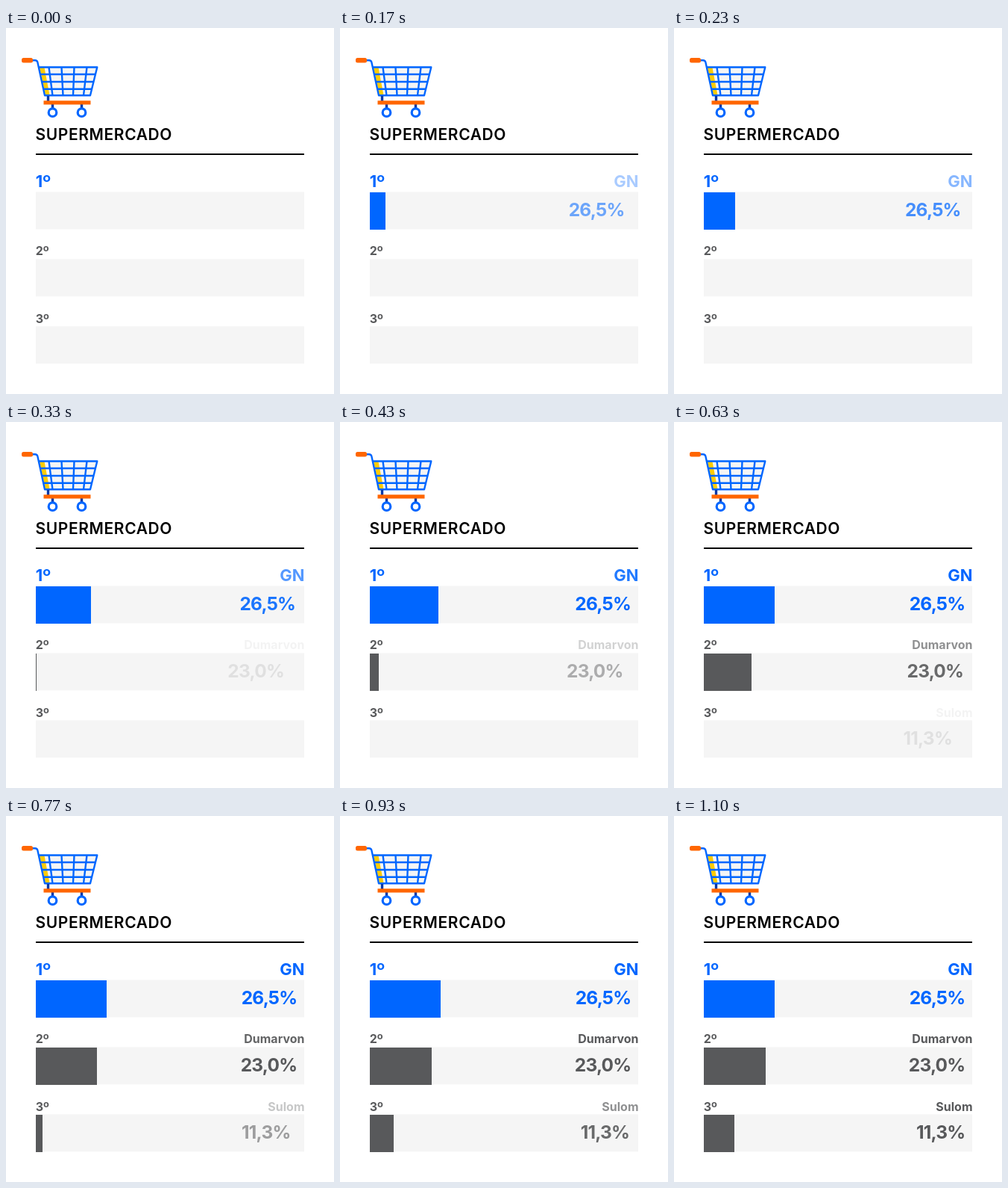
Recreate the animation shown at these times as an HTML page. Size 440 px wide and 490 px high, loop 1130 ms.

```html
<!DOCTYPE html>
<html lang="pt">
<head>
<meta charset="utf-8">
<title>Supermercado</title>
<style>
  html, body { margin: 0; width: 100%; height: 100%; overflow: hidden; background: #fff; }
  svg { display: block; width: 440px; height: 490px; }
  text { font-family: Inter, "Open Sans", sans-serif; font-weight: 700; }
  .title { font-size: 21px; font-weight: 600; letter-spacing: .6px; }
  .place, .name { font-size: 16px; }
  .first .place, .first .name { font-size: 22px; }
  .value { font-size: 24.5px; letter-spacing: -.8px; }
  .name, .value { text-anchor: end; }
</style>
</head>
<body>
<svg viewBox="0 0 440 490">
  <g fill="none" stroke="#06f" stroke-width="2.4" stroke-linejoin="round">
    <path d="M44 52.500H122L113 90.500H52Z" fill="#f5f5f5" stroke="none"/>
    <path d="M45 53H51.500L58.500 90H53Z" fill="#fc0" stroke="none"/>
    <path d="M35 43.300H39Q41.800 43.300 42.400 46L52 90.300H113L122.300 52.500H43.700"/>
    <path d="M46 62H120M48 72H117.500M50 81.700H115M57.500 52.500L62.500 90.300M74.500 52.500L76.500 90.300M91.500 52.500L90 90.300M108.500 52.500L104 90.300"/>
    <path d="M56.500 91V98M62.500 102V108M101.500 102V108" stroke="#0038a8" stroke-width="3.4"/>
    <circle cx="62.500" cy="113.200" r="5.300" stroke-width="3.200"/>
    <circle cx="101.500" cy="113.200" r="5.300" stroke-width="3.200"/>
    <g fill="#f60" stroke="none">
      <rect x="21" y="40" width="15" height="6.600" rx="2.500"/>
      <rect x="50.500" y="97.300" width="63" height="5.200"/>
    </g>
  </g>
  <text class="title" x="39.500" y="149.500">SUPERMERCADO</text>
  <rect x="40" y="168" width="360" height="2"/>
  <g id="rows"></g>
</svg>
<script>
const LEFT = 40, WIDTH = 360, LOOP = 1130, FPS = 30;
const STAGGER = 9, LENGTH = 15; // in steps of 1/30 s
const ranking = [
  { name: "GN", share: 26.5, color: "#06f", base: 213.3 },
  { name: "Dumarvon", share: 23, color: "#58595b", base: 304 },
  { name: "Sulom", share: 11.3, color: "#58595b", base: 394.8 }
];

const easeInOut = p => p < .5 ? 2 * p * p : 1 - 2 * (1 - p) ** 2;
const easeOut = p => 1 - (1 - p) ** 2;

function add(parent, tag, attrs, text = "") {
  const el = document.createElementNS("http://www.w3.org/2000/svg", tag);
  for (const key in attrs) el.setAttribute(key, attrs[key]);
  el.textContent = text;
  return parent.appendChild(el);
}

const rows = ranking.map(({ name, share, color, base }, i) => {
  const top = 220 + 90 * i;
  const g = add(document.getElementById("rows"), "g", { fill: color, class: i ? "" : "first" });
  add(g, "rect", { x: LEFT, y: top - .6, width: WIDTH, height: 50, fill: "#f5f5f5" });
  add(g, "text", { class: "place", x: LEFT - .3, y: base }, `${i + 1}º`);
  return {
    share,
    bar: add(g, "rect", { x: LEFT, y: top, height: 50 }),
    name: add(g, "text", { class: "name", x: 400.5, y: base }, name),
    value: add(g, "text", { class: "value", y: top + 32.4 }, share.toFixed(1).replace(".", ",") + "%")
  };
});

function draw(ms) {
  const step = Math.floor((ms % LOOP + 5) * FPS / 1000);
  rows.forEach(({ share, bar, name, value }, i) => {
    const p = Math.min(1, Math.max(0, (step - i * STAGGER) / LENGTH));
    const out = easeOut(p);
    bar.setAttribute("width", Math.round(WIDTH * share / 100 * easeInOut(p)));
    name.setAttribute("opacity", p);
    value.setAttribute("opacity", out);
    value.setAttribute("x", 370.4 + 20 * out);
  });
}

let start;
function tick(now) {
  start ??= now;
  draw(now - start);
  requestAnimationFrame(tick);
}
draw(0);
requestAnimationFrame(tick);
</script>
</body>
</html>
```
